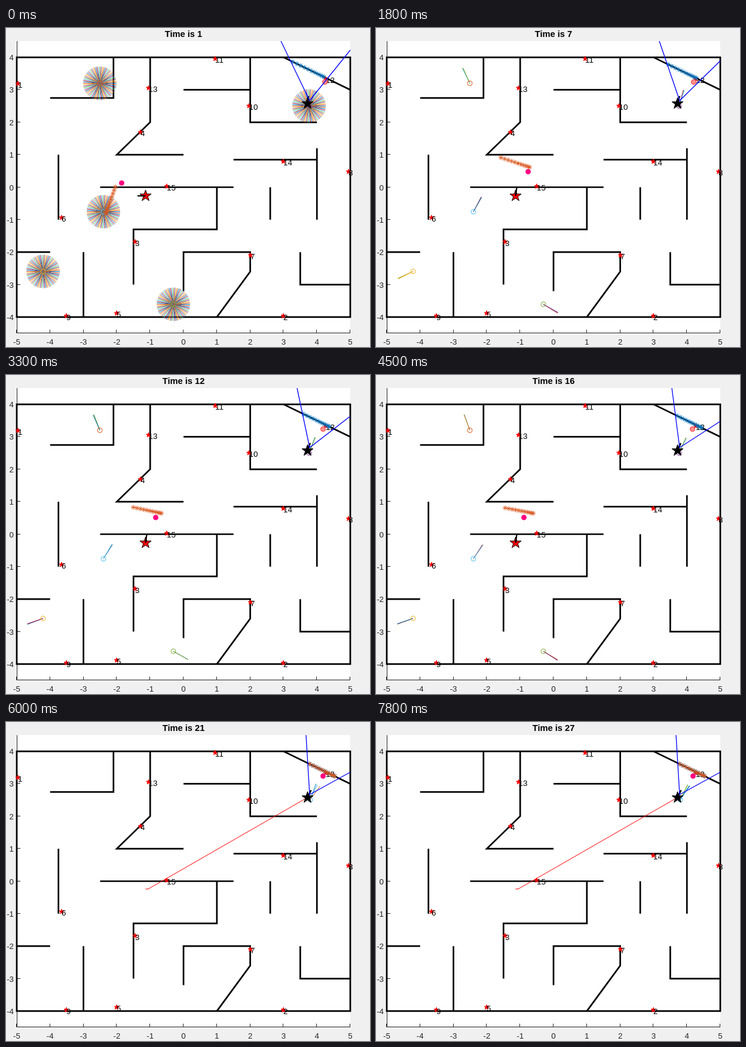
These frames come from a looping animation (609 by 534 pixels, 8 s). An HTML page with a canvas:

```html
<!DOCTYPE html>
<html lang="en">
<head>
<meta charset="utf-8">
<title>Localisation map</title>
<style>
html, body { margin: 0; height: 100%; overflow: hidden; background: #f0f0f0; }
canvas { display: block; }
</style>
</head>
<body>
<canvas id="stage" width="609" height="534"></canvas>
<script>
const ctx = document.getElementById('stage').getContext('2d');
const STEP = 300, LOOP = 8000, MERGE = 20;
const FONT = '"Liberation Sans", Arial, sans-serif';
const COLORS = ['#0072bd', '#d95319', '#edb120', '#7e2f8e', '#77ac30', '#4dbeee', '#a2142f'];
const px = x => 297 + 55.8 * x;
const py = y => 266.5 - 54.35 * y;

// Walls as polylines in map units
const WALLS = [
  [-5, 4, 5, 4, 5, -4, -5, -4, -5, 4, 5, 4],
  [-4, 2.75, -2.1, 2.75, -2.1, 4],
  [-1, 4, -1, 2, -2, 1, 0, 1],
  [0, 3, 2, 3], [2, 4, 2, 2, 4, 2], [3, 4, 5, 3],
  [-3.75, 1, -3.75, -1], [-2.5, 0, 1.5, 0],
  [1, 0, 1, -1.3, -1.5, -1.3, -1.5, -3],
  [1.5, .85, 4, .85], [4, 1.2, 4, -1], [2.6, 0, 2.6, -1],
  [-5, -2, -4, -2], [-3, -2, -3, -4],
  [0, -3.2, 0, -2, 2, -2, 2, -2.6, 1, -4],
  [3.5, -2, 3.5, -3, 5, -3]
];
// Landmarks: label, x, y in pixels
const MARKS = [
  [1, 20, 93], [2, 464, 482], [3, 216, 358], [4, 225, 174.5], [5, 185, 477.5],
  [6, 93, 317.5], [7, 409, 380.5], [8, 573, 240.5], [9, 101, 482], [10, 406.5, 130.5],
  [11, 350, 51.5], [12, 535, 85.5], [13, 238.5, 100.5], [14, 464, 223.5], [15, 269, 265]
];
// Particle clusters: x, y, ring colour, headings in degrees
const CLUSTERS = [
  [157, 92.5, 1, [118, 117, 115, 112, 110]],
  [163, 307.5, 5, [62, 62, 61, 59, 57]],
  [62, 407.5, 2, [207, 207, 206, 201, 199]],
  [280, 462.5, 4, [-32, -32, -31, -30, -31]],
  [507, 130.5, 3, [66, 66, 73, 69, 65]]
];
const TIMES = [1, 4, 7, 12, 16, 20];

function key(n, values) {
  const last = values.length - 1;
  for (let i = 0; i < last; i++) {
    if (n < TIMES[i + 1]) {
      const u = (n - TIMES[i]) / (TIMES[i + 1] - TIMES[i]);
      return values[i] + (values[i + 1] - values[i]) * u;
    }
  }
  return values[last];
}

function random(seed) {
  const v = Math.sin(seed * 127.1) * 43758.5453;
  return v - Math.floor(v);
}

function line(points, color, width) {
  ctx.beginPath();
  for (let i = 0; i < points.length; i += 2) ctx.lineTo(points[i], points[i + 1]);
  ctx.strokeStyle = color;
  ctx.lineWidth = width;
  ctx.stroke();
}

function circle(x, y, r, edge, fill) {
  ctx.beginPath();
  ctx.arc(x, y, r, 0, Math.PI * 2);
  if (fill) { ctx.fillStyle = fill; ctx.fill(); }
  ctx.strokeStyle = edge;
  ctx.lineWidth = 1;
  ctx.stroke();
}

function star(x, y, r, fill, edge) {
  ctx.beginPath();
  for (let i = 0; i < 10; i++) {
    const a = i * Math.PI / 5, d = i % 2 ? r * .39 : r;
    ctx.lineTo(x + d * Math.sin(a), y - d * Math.cos(a));
  }
  ctx.closePath();
  ctx.fillStyle = fill;
  ctx.fill();
  ctx.strokeStyle = edge;
  ctx.lineWidth = 1;
  ctx.stroke();
}

function text(s, x, y, align, font = '13.33px ', color = '#262626') {
  ctx.font = font + FONT;
  ctx.textAlign = align;
  ctx.fillStyle = color;
  ctx.fillText(s, x, y);
}

// Row of asterisks that gets denser toward its end
function asterisks(x0, y0, x1, y1, color) {
  for (let i = 0; i < 11; i++) {
    const u = 1 - Math.pow(1 - i / 10, 1.3);
    const x = x0 + (x1 - x0) * u, y = y0 + (y1 - y0) * u;
    line([x - 4, y, x + 4, y], color, 1);
    line([x, y - 4, x, y + 4], color, 1);
    line([x - 3, y - 3, x + 3, y + 3], color, 1);
    line([x - 3, y + 3, x + 3, y - 3], color, 1);
  }
}

function ray(x, y, degrees, color) {
  const a = degrees * Math.PI / 180;
  line([x, y, x + 28 * Math.cos(a), y - 28 * Math.sin(a)], color, 1);
}

function cluster(x, y, ring, heading, count, spread, seed) {
  for (let i = 0; i < count; i++) {
    const turn = (random(seed + i) - .5) * spread;
    ray(x, y, heading + turn, COLORS[Math.floor(random(seed + i + 50) * 7)]);
  }
  circle(x, y, 4, COLORS[ring]);
}

function drawMap(n) {
  ctx.fillStyle = '#f0f0f0';
  ctx.fillRect(0, 0, 609, 534);
  ctx.fillStyle = '#fff';
  ctx.fillRect(18, 22, 558, 489);
  line([18.5, 22, 18.5, 510.5, 576, 510.5], '#262626', 1);
  for (let i = -5; i <= 5; i++) {
    const x = Math.round(px(i)) - .5;
    line([x, 511, x, 505], '#262626', 1);
    text(i, px(i), 530, 'center');
    if (Math.abs(i) > 4) continue;
    const y = Math.round(py(i)) - .5;
    line([18, y, 24, y], '#262626', 1);
    text(i, 13, py(i) + 5, 'right');
  }
  text('Time is ' + n, 297, 15, 'center', 'bold 14.67px ', '#000');
  for (const wall of WALLS) {
    line(wall.map((v, i) => i % 2 ? py(v) : px(v)), '#000', 2.7);
  }
  for (const [label, x, y] of MARKS) {
    star(x, y, 4.2, '#f00', '#f00');
    text(label, x, y + 6.5, 'left', '13.33px ', '#000');
  }
}

function drawClusters(n) {
  if (n >= MERGE) {
    cluster(509, 130, 5, 62, 5, 17, n * 61);
    return;
  }
  CLUSTERS.forEach(([x, y, ring, headings], k) => {
    if (n === 1) {
      for (let i = 0; i < 72; i++) ray(x, y, i * 5, COLORS[i % 7]);
      circle(x, y, 4, COLORS[ring]);
    } else {
      const spread = n === 2 ? 30 : n === 3 ? 16 : n < 7 ? 9 : 4;
      cluster(x, y, ring, key(n, headings), n < 4 ? 6 : 3, spread, n * 61 + k * 7);
    }
  });
}

function drawTracks(n) {
  const merged = n >= MERGE;
  const bx = key(n, [480, 484, 489, 498, 504, 508]);
  const ex = key(n, [532, 533, 536, 541, 545, 550]);
  const wallY = x => 49 + (x - 464.4) * .487;
  asterisks(bx, wallY(bx), ex, wallY(ex), COLORS[0]);

  if (merged) {
    const shift = random(n) * 2;
    asterisks(508 + shift, wallY(508 + shift), 550, wallY(550), COLORS[1]);
    circle(530.5, 90.5, 4, '#ff0080', '#ff0080');
    line([233.5, 279.5, 238, 279.5, 505, 126], '#f00', 1);
  } else {
    circle(key(n, [533.5, 532.5, 531.5, 530.5, 529.5]), 90.5, 4, '#f33', '#ff9090');
    if (n === 1) {
      asterisks(183, 266, 167, 310, COLORS[1]);
      circle(193.5, 259.5, 4, '#ff0080', '#ff0080');
    } else {
      asterisks(key(n, [208, 208, 209, 213, 216]), key(n, [212, 213, 217, 221.5, 222.5]),
        key(n, [258, 258, 257, 260, 263]), key(n, [234, 234, 233, 231.5, 231.5]), COLORS[1]);
      circle(key(n, [259, 258.5, 254.5, 250.5, 247.5]),
        key(n, [243, 242.5, 240.5, 238.5, 238.5]), 4, '#ff0080', '#ff0080');
    }
    star(233.5, 281, 10, '#f00', '#000');
    line(n === 1 ? [233.5, 281, 220, 281] : [233.5, 281, 235.5, 267], '#000', 2.2);
  }
}

function drawRobot(n) {
  star(504.5, 126.5, 10, '#000', '#000');
  line([504.5, 126.5, key(n, [506, 507, 508, 509, 510, 510.5]), 114], '#000', 2.4);
  const left = key(n, [460, 465, 474, 487, 495, 502]);
  const right = key(n, [37, 44, 55, 69, 77.5, 84]);
  line([left, 22, 508, 121.5, 576, right], '#00f', 1.3);
}

function frame() {
  const n = 1 + Math.floor(performance.now() % LOOP / STEP);
  drawMap(n);
  drawClusters(n);
  drawTracks(n);
  drawRobot(n);
  requestAnimationFrame(frame);
}
frame();
</script>
</body>
</html>
```
